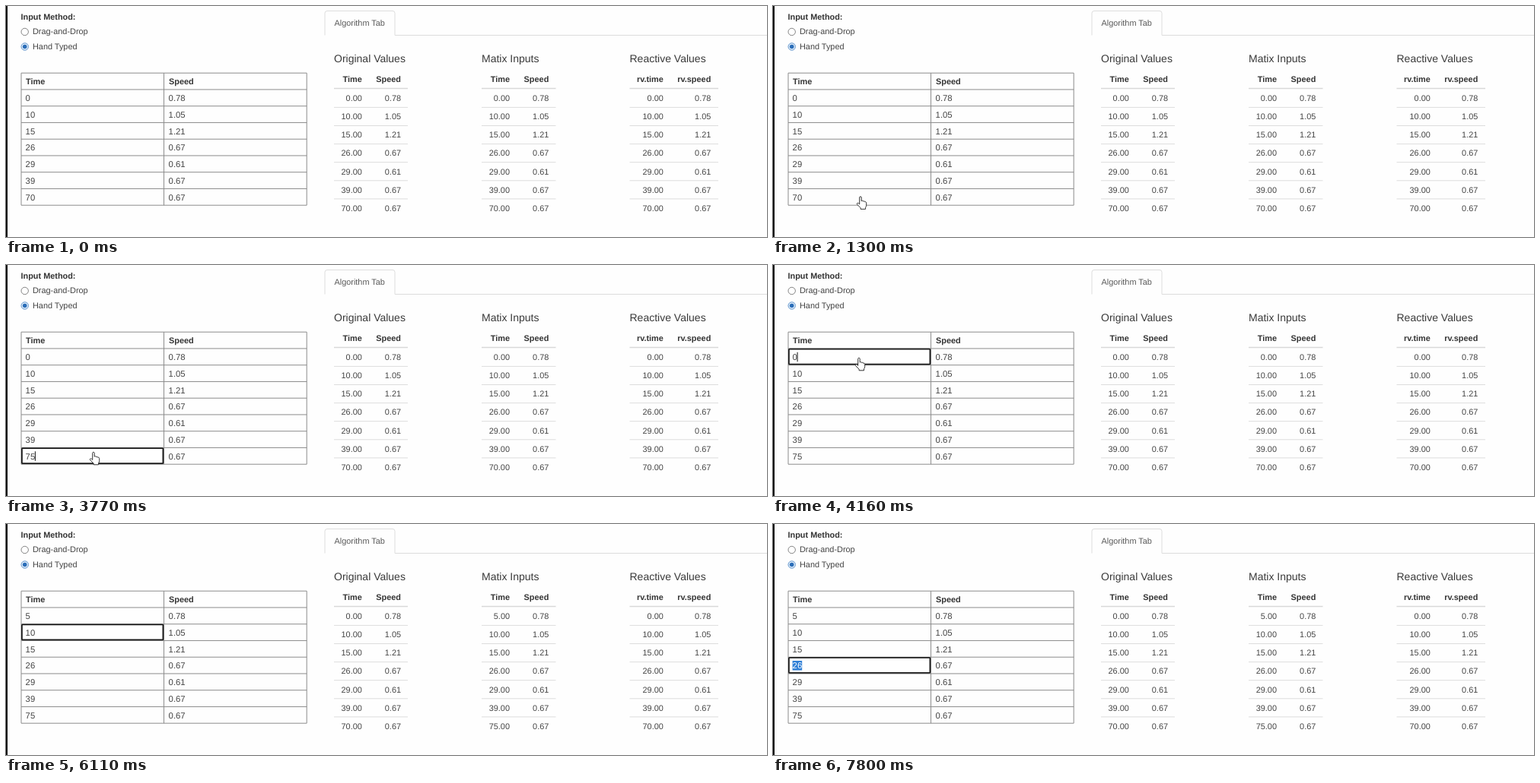
These frames come from a looping animation (1000 by 304 pixels, 8000 ms). An HTML page:

```html
<!DOCTYPE html>
<html lang="en">
<head>
<meta charset="utf-8">
<title>Matrix input</title>
<style>
html, body { margin: 0; width: 100%; height: 100%; overflow: hidden; background: #fefefe; }
svg { display: block; width: 1000px; height: 304px; }
text { font-family: "Liberation Sans", Arial, sans-serif; font-size: 10.9px; fill: #444; white-space: pre; text-rendering: geometricPrecision; }
.bold { font-weight: bold; fill: #333; }
.title { font-size: 14px; fill: #3a3a3a; }
.cell { font-size: 11.3px; }
.end { text-anchor: end; }
</style>
</head>
<body>
<svg id="stage" viewBox="0 0 1000 304"></svg>
<script>
const LOOP = 8000, STEP = 130;
const svg = document.getElementById('stage');
const times = ['0', '10', '15', '26', '29', '39', '70'];
const speeds = ['0.78', '1.05', '1.21', '0.67', '0.61', '0.67', '0.67'];
const gridX = [20, 207.5, 395.2], gridY = 88.2, gridH = 21.75;

function add(name, attrs, content) {
  const el = document.createElementNS('http://www.w3.org/2000/svg', name);
  for (const key in attrs) el.setAttribute(key, attrs[key]);
  if (content !== undefined) el.textContent = content;
  svg.appendChild(el);
  return el;
}
const label = (x, y, str, cls = '') => add('text', { x, y, class: cls }, str);
const line = (x1, y1, x2, y2, stroke, width = 1) =>
  add('line', { x1, y1, x2, y2, stroke, 'stroke-width': width });
const show = (el, on) => el.setAttribute('visibility', on ? 'visible' : 'hidden');
const place = (el, attrs) => { for (const key in attrs) el.setAttribute(key, attrs[key]); };

add('rect', { width: 1000, height: 304, fill: '#fefefe' });
add('rect', { width: 2, height: 304, fill: '#080808' });

// input method
label(19.5, 17.8, 'Input Method:', 'bold');
label(35, 37.2, 'Drag-and-Drop');
label(35, 56.8, 'Hand Typed');
add('circle', { cx: 24.7, cy: 34, r: 4.7, fill: '#fff', stroke: '#858585' });
add('circle', { cx: 24.7, cy: 53.5, r: 4.7, fill: '#e4effa', stroke: '#5d92cb' });
add('circle', { cx: 24.7, cy: 53.5, r: 2.8, fill: '#2a6db8' });

// tab
add('path', { d: 'M419 38.5V9.5q0-3 3-3H508q3 0 3 3V38.5H1000', fill: 'none', stroke: '#ddd' });
label(431.5, 26, 'Algorithm Tab').style.fill = '#5a5a5a';

// value tables
function valueTable(x, width, title, heads, ends) {
  label(x, 74, title, 'title');
  heads.forEach((h, i) => label(ends[i], 100.3, h, 'bold end'));
  line(x, 108.5, x + width, 108.5, '#d8d8d8', 1.5);
  return times.map((t, i) => {
    const y = 125.1 + i * 24.1;
    if (i) line(x, y - 15.8, x + width, y - 15.8, '#ddd');
    label(ends[1], y, speeds[i], 'end');
    return label(ends[0], y, (+t).toFixed(2), 'end');
  });
}
valueTable(431, 97, 'Original Values', ['Time', 'Speed'], [467.8, 519]);
const matrix = valueTable(625, 97.5, 'Matix Inputs', ['Time', 'Speed'], [662, 713.3]);
valueTable(819.5, 116.5, 'Reactive Values', ['rv.time', 'rv.speed'], [863.8, 926.3]);

// editable grid
for (let i = 0; i < 9; i++) line(gridX[0], gridY + i * gridH, gridX[2], gridY + i * gridH, '#8c8c8c');
gridX.forEach(x => line(x, gridY, x, gridY + 8 * gridH, '#8c8c8c'));
const textX = [25.6, 213.6];
label(26, 103.3, 'Time', 'bold');
label(214, 103.3, 'Speed', 'bold');
const focus = add('rect', { fill: '#fff', stroke: '#1c1c1c', 'stroke-width': 1.8, rx: 1 });
const mark = add('rect', { height: 12.5, fill: '#2f7fd6' });
const cells = [times, speeds].map((col, c) =>
  col.map((v, r) => label(textX[c], 125.1 + r * gridH, v, 'cell')));
const caret = add('rect', { width: 1, height: 12.5, fill: '#111' });
const hand = add('path', {
  d: 'M4.2 1.5C4.2-.2 6.7-.2 6.7 1.5V6.2C7.2 5.3 9 5.5 9.1 6.7C9.8 5.9 11.2 6.2 11.3 7.4C12.1 6.9 13.2 7.3 13.2 8.6V11.6Q13.2 13.2 12 14.8V16.8H5.6V15.2L1.1 10.6C.1 9.3 1.6 8.2 2.8 9.1L4.2 10.4Z',
  fill: '#fff', stroke: '#333', 'stroke-width': 1, 'stroke-linejoin': 'round'
});

// [start, column, row, selected]
const focusSteps = [
  [0, -1, 0], [1560, 0, 6], [4160, 0, 0], [5590, 1, 0, true], [6110, 0, 1],
  [6240, 0, 1, true], [6370, 1, 1, true], [6630, 0, 2, true],
  [6890, 1, 2, true], [7410, 0, 3, true]
];
const lastEdit = [[0, '70'], [2600, '7'], [3250, '75']];
const firstEdit = [[0, '0'], [4550, ''], [5330, '5']];
const pick = (list, t) => list.filter(s => s[0] <= t).pop();

// [start, end, hide, from, to]
const moves = [
  [780, 1300, 2600, [124, 290], [109.5, 250.5]],
  [3770, 4160, 4550, [109.5, 246], [107.5, 122]]
];

function setText(el, str) {
  if (el.textContent !== str) el.textContent = str;
}

function render(ms) {
  const t = Math.floor(ms / STEP) * STEP;
  setText(cells[0][6], pick(lastEdit, t)[1]);
  setText(cells[0][0], pick(firstEdit, t)[1]);
  setText(matrix[6], t >= 4290 ? '75.00' : '70.00');
  setText(matrix[0], t >= 5720 ? '5.00' : '0.00');

  const [start, col, row, selected] = pick(focusSteps, t);
  const active = col >= 0;
  show(focus, active);
  show(mark, active && selected);
  show(caret, active && !selected && start !== 6110);
  cells.forEach((list, c) => list.forEach((el, r) => {
    el.style.fill = selected && c === col && r === row ? '#fff' : '';
  }));
  if (active) {
    const top = gridY + (row + 1) * gridH;
    const cell = cells[col][row];
    const width = cell.textContent ? cell.getComputedTextLength() : 0;
    place(focus, { x: gridX[col] + 0.9, y: top + 0.6, width: gridX[col + 1] - gridX[col] - 2, height: gridH - 1.6 });
    place(mark, { x: textX[col], y: top + 4.8, width });
    place(caret, { x: textX[col] + width - 0.3, y: top + 4.8 });
  }

  const move = moves.find(m => t >= m[0] && t < m[2]);
  show(hand, !!move);
  if (move) {
    const [begin, end, , from, to] = move;
    const p = Math.min(1, (t - begin) / (end - begin));
    const e = p * (2 - p);
    const at = from.map((v, i) => v + (to[i] - v) * e);
    hand.setAttribute('transform', `translate(${at})`);
  }
}

const origin = performance.now();
function tick() {
  render((performance.now() - origin) % LOOP);
  requestAnimationFrame(tick);
}
tick();
</script>
</body>
</html>
```
